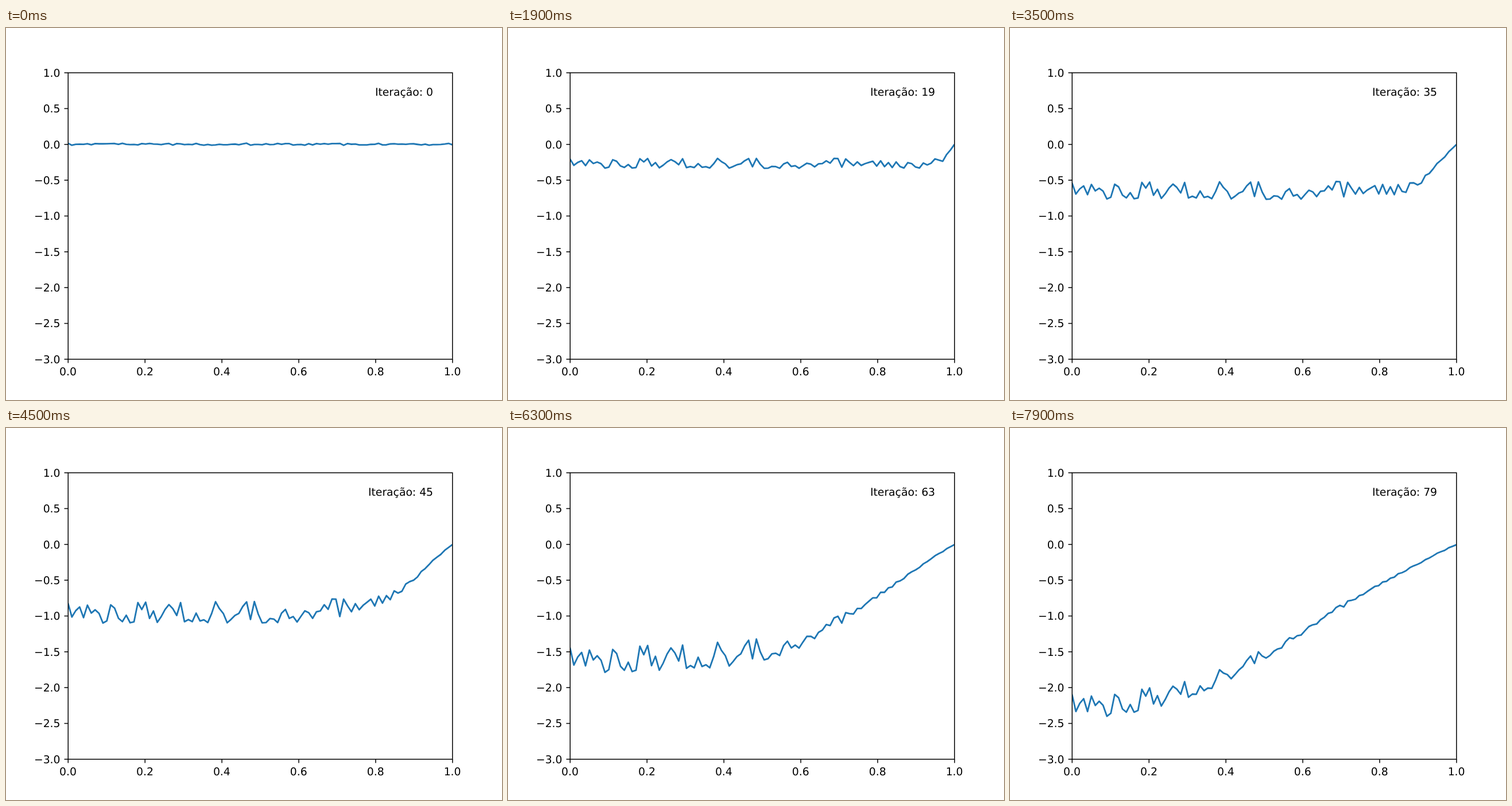
An HTML page that plays this animation: 864 px wide and 648 px high, repeating every 8000 ms.

```html
<!DOCTYPE html>
<html lang="pt">
<head>
<meta charset="utf-8">
<title>Iteração</title>
<style>
  html, body { margin: 0; width: 100%; height: 100%; overflow: hidden; background: #fff; }
  svg { display: block; width: 864px; height: 648px; }
  text { font: 18.75px "DejaVu Sans", sans-serif; fill: #000; text-rendering: geometricPrecision; }
</style>
</head>
<body>
<svg viewBox="0 0 864 648">
  <defs><clipPath id="inside"><rect x="108" y="77.76" width="669.6" height="498.96"/></clipPath></defs>
  <polyline id="curve" clip-path="url(#inside)" fill="none" stroke="#1f77b4" stroke-width="2.81" stroke-linejoin="round"/>
  <g id="axes" fill="none" stroke="#000" stroke-width="1.5"><rect x="108.25" y="78" width="669.5" height="499"/></g>
  <g id="labels"></g>
  <text id="counter" x="744" y="118" text-anchor="end"></text>
</svg>
<script>
const SVG_NS = "http://www.w3.org/2000/svg";
const LEFT = 108, WIDTH = 669.6, TOP = 77.76, HEIGHT = 498.96;
const ZERO_Y = TOP + HEIGHT / 4;
const LAST_POINT = 99, STEP_MS = 100, STEPS = 80;
const $ = id => document.getElementById(id);

function add(parent, tag, attrs, text = "") {
  const node = document.createElementNS(SVG_NS, tag);
  for (const name in attrs) node.setAttribute(name, attrs[name]);
  node.textContent = text;
  parent.append(node);
}

function drawAxes() {
  for (let n = 0; n <= 5; n++) {
    const x = LEFT + WIDTH * n / 5;
    add($("axes"), "path", { d: `M${x + 0.25} 577v6.5` });
    add($("labels"), "text", { x, y: 605, "text-anchor": "middle" }, (n / 5).toFixed(1));
  }
  for (let n = 0; n <= 8; n++) {
    const y = TOP + HEIGHT * n / 8;
    const label = (1 - n / 2).toFixed(1).replace("-", "\u2212");
    add($("axes"), "path", { d: `M108 ${y + 0.25}h-6.5` });
    add($("labels"), "text", { x: 94.5, y: Math.round(y + 7), "text-anchor": "end" }, label);
  }
}

// Repeatable uniform random numbers between -1 and 1
function seededRandom(seed) {
  return () => {
    seed = (seed + 0x6d2b79f5) | 0;
    let h = Math.imul(seed ^ (seed >>> 15), seed | 1);
    h ^= h + Math.imul(h ^ (h >>> 7), h | 61);
    return ((h ^ (h >>> 14)) >>> 0) / 2 ** 31 - 1;
  };
}

const random = seededRandom(7);
const points = Array.from({ length: LAST_POINT + 1 }, (_, i) => ({
  x: LEFT + WIDTH * i / LAST_POINT,
  fromEnd: LAST_POINT - i,
  ripple: 1.8 * random(),
  rough: 15 * random()
}));

const settle = (step, time) => 1 - Math.exp(-step / time);

// The line sinks towards a terminal speed while a smooth ramp,
// held at zero on the right, spreads leftwards and irons out the roughness.
function shapeAt(step) {
  const t = step / (STEPS - 1);
  return {
    depth: 7 * (step - 50 * settle(step, 50)) + 12 * settle(step, 8),
    reach: 1.5 + 87 * t ** 2.55,
    bend: 2.5 + 2.5 * t ** 6,
    roughness: 1.8 * Math.sin(step / 58),
    ripple: Math.max(0, 1 - step / 19)
  };
}

function heightAt(point, shape) {
  const z = point.fromEnd / shape.reach;
  const rise = z * (1 + 0.4 * z);
  const ramp = rise / (1 + rise ** shape.bend) ** (1 / shape.bend);
  const keep = 1 / (1 + Math.exp(-5 * (z - 0.68)));
  return ZERO_Y + shape.depth * ramp
    + point.rough * shape.roughness * keep
    + point.ripple * shape.ripple;
}

function render(step) {
  const shape = shapeAt(step);
  $("curve").setAttribute("points", points.map(p =>
    `${p.x.toFixed(2)},${heightAt(p, shape).toFixed(2)}`).join(" "));
  $("counter").textContent = `Iteração: ${step}`;
}

let start = null, shown = -1;
function tick(now) {
  start ??= now;
  const step = Math.floor((now - start) / STEP_MS) % STEPS;
  if (step !== shown) render(shown = step);
  requestAnimationFrame(tick);
}

drawAxes();
render(0);
requestAnimationFrame(tick);
</script>
</body>
</html>
```
